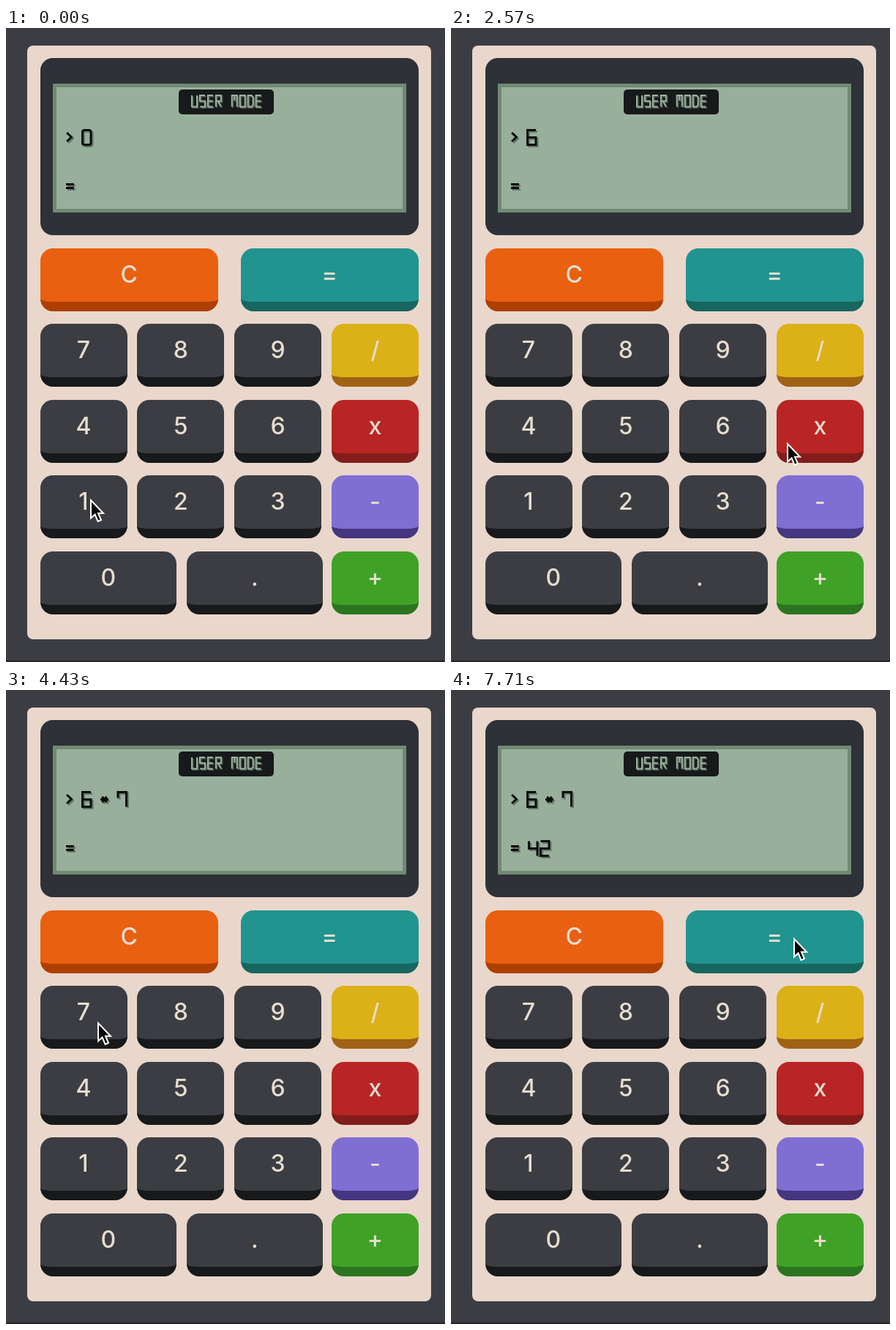
Write an HTML page that moves like this. It is 600 by 866 pixels and loops after 8 s.

```html
<!DOCTYPE html>
<html lang="en">
<head>
<meta charset="utf-8">
<title>Calculator</title>
<style>
  html, body { margin: 0; width: 100%; height: 100%; overflow: hidden; background: #3c3d43; }
  #stage { position: relative; width: 600px; height: 866px; overflow: hidden; }
  #stage > * { position: absolute; box-sizing: border-box; }
  .case { left: 29px; top: 24px; width: 552px; height: 811px; border-radius: 8px; background: #e9d7cc; }
  .bezel { left: 46.5px; top: 41px; width: 517.5px; height: 242px; border-radius: 17px; background: #2e3137; }
  .lcd { left: 64px; top: 76px; width: 483px; height: 176px; border: 5px solid #718a74; background: #98b09b; }
  .badge { left: 236px; top: 84px; width: 129.5px; height: 33.5px; border-radius: 5px; background: #17191a; }
  .edge { left: 0; top: 864px; width: 600px; height: 2px; background: #25262a; }
  .key {
    height: 86px; border-radius: 17px; border-bottom: 13.5px solid;
    font: 500 32px/71px Inter, sans-serif; text-align: center;
  }
  .key span { color: #e6ddcf; }
  .key.down { border-bottom-width: 7px; line-height: 77px; }
  svg { left: 0; top: 0; fill: none; }
  svg path { vector-effect: non-scaling-stroke; }
</style>
</head>
<body>
<div id="stage">
  <div class="case"></div>
  <div class="bezel"></div>
  <div class="lcd"></div>
  <div class="badge"></div>
  <div class="edge"></div>
  <svg id="ink" width="600" height="866" role="img" aria-label="USER MODE"></svg>
</div>
<script>
const stage = document.getElementById('stage');
const ink = document.getElementById('ink');
const keys = {};

// Keypad
const DARK = ['#3c3d42', '#17191a'];
function addKey(label, x, y, width, [face, side] = DARK) {
  const key = document.createElement('div');
  key.className = 'key';
  key.innerHTML = `<span>${label}</span>`;
  key.style.cssText =
    `left:${x}px;top:${y}px;width:${width}px;background:${face};border-color:${side}`;
  stage.insertBefore(key, ink);
  keys[label] = key;
}
addKey('C', 46.5, 300.5, 243.5, ['#e96010', '#ad3f00']);
addKey('=', 320.5, 300.5, 243.5, ['#219490', '#17665f']);
['789', '456', '123'].forEach((row, r) =>
  [...row].forEach((digit, c) => addKey(digit, 46.5 + c * 132.8, 404 + r * 103.5, 119)));
addKey('0', 46.5, 714.5, 186.5);
addKey('.', 246.5, 714.5, 186.5);
[['/', '#dcb017', '#9f6214'], ['x', '#b92525', '#821d1b'],
 ['-', '#806fd2', '#443680'], ['+', '#3fa226', '#2b7520']]
  .forEach(([label, ...colors], r) => addKey(label, 445, 404 + r * 103.5, 119, colors));

// Segment glyphs on a grid one unit wide and two high
const GLYPHS = {
  0: 'M.15 0H.85L1 .15V1.85L.85 2H.15L0 1.85V.15Z',
  2: 'M0 0H1V1H0V2H1',
  4: 'M0 0V1H1M1 0V2',
  6: 'M1 0H0V2H1V1H0',
  7: 'M0 .8V0H1V2',
  U: 'M0 0V2H1V0',
  S: 'M1 0H0V1H1V2H0',
  E: 'M1 0H0V2H1M0 1H1',
  R: 'M0 2V0H1V1H0M.4 1L1 2',
  M: 'M0 2V0H1V2M.5 0V.9',
  O: 'M0 0H1V2H0Z',
  D: 'M0 0H.7L1 .3V1.7L.7 2H0Z',
  '>': 'M.05 .4L.6 1L.05 1.6',
  '=': 'M0 .75H.95M0 1.25H.95',
  '*': 'M0 1H.95M.2 .62L.75 1.38M.75 .62L.2 1.38',
};
const BIG = { w: 11.5, h: 10, line: 3, shadow: 2, color: '#0b0d0c', shade: '#65776c' };
const SMALL = { w: 7, h: 7.7, line: 2, shadow: 1.5, color: '#9ab29d', shade: '#536057' };

function addGlyph(char, x, y, style) {
  const { w, h, line, shadow, color, shade } = style;
  const stroke = (dx, paint) =>
    `<path d="${GLYPHS[char]}" transform="translate(${x + dx} ${y + dx}) scale(${w} ${h})"
       stroke="${paint}" stroke-width="${line}"/>`;
  const group = document.createElementNS('http://www.w3.org/2000/svg', 'g');
  group.innerHTML = stroke(shadow, shade) + stroke(0, color);
  ink.append(group);
  return group;
}

[...'USER MODE'].forEach((char, i) => {
  if (char !== ' ') addGlyph(char, 254 + i * 10.95, 92, SMALL);
});
addGlyph('>', 82.5, 139, BIG);
addGlyph('=', 82, 206, BIG);

// Glyphs visible between two times
const timed = [
  ['0', 104.5, 139.5, 0, 1570],
  ['6', 104.5, 139.5, 1570, 8000],
  ['*', 129, 139.5, 2710, 8000],
  ['7', 153, 139.5, 4140, 8000],
  ['4', 106.5, 206.5, 6570, 8000],
  ['2', 122.5, 206.5, 6570, 8000],
].map(([char, x, y, from, to]) => ({ node: addGlyph(char, x, y, BIG), from, to }));

const presses = [['6', 1570], ['x', 2710], ['7', 4140], ['=', 6570]];

// Pointer stops: time, x, y
const route = [
  [0, 115, 643], [140, 115, 643], [860, 303, 517], [1140, 378, 545], [1720, 378, 545],
  [2430, 459, 566], [2720, 459, 566], [3290, 142, 522], [3430, 142, 522],
  [3860, 125, 453], [4720, 125, 453], [5710, 508, 448], [6430, 468, 338], [8000, 468, 338],
];
const pointer = document.createElementNS('http://www.w3.org/2000/svg', 'path');
pointer.setAttribute('d', 'M1 2V26.5L6.6 21.5L10.6 31L15 29L11 19.8H18Z');
pointer.setAttribute('fill', '#060606');
pointer.setAttribute('stroke', '#fff');
pointer.setAttribute('stroke-width', '2');
ink.append(pointer);

function pointerAt(t) {
  const i = route.findIndex(stop => stop[0] > t);
  const [t0, x0, y0] = route[i - 1], [t1, x1, y1] = route[i];
  const u = (t - t0) / (t1 - t0), e = u * u * (3 - 2 * u);
  return [x0 + (x1 - x0) * e, y0 + (y1 - y0) * e];
}

const LOOP = 8000, FPS = 7;
function draw(now) {
  // Motion advances in steps of 1/7 s, rounded to 10 ms
  const step = Math.floor(((now % LOOP) + 4) * FPS / 1000) % (LOOP * FPS / 1000);
  const t = Math.round(step * 100 / FPS) * 10;
  for (const { node, from, to } of timed) {
    node.style.display = t >= from && t < to ? '' : 'none';
  }
  for (const [label, at] of presses) keys[label].classList.toggle('down', t === at);
  pointer.setAttribute('transform', `translate(${pointerAt(t).join(' ')})`);
  requestAnimationFrame(() => draw(performance.now() - start));
}
const start = performance.now();
draw(0);
</script>
</body>
</html>
```
